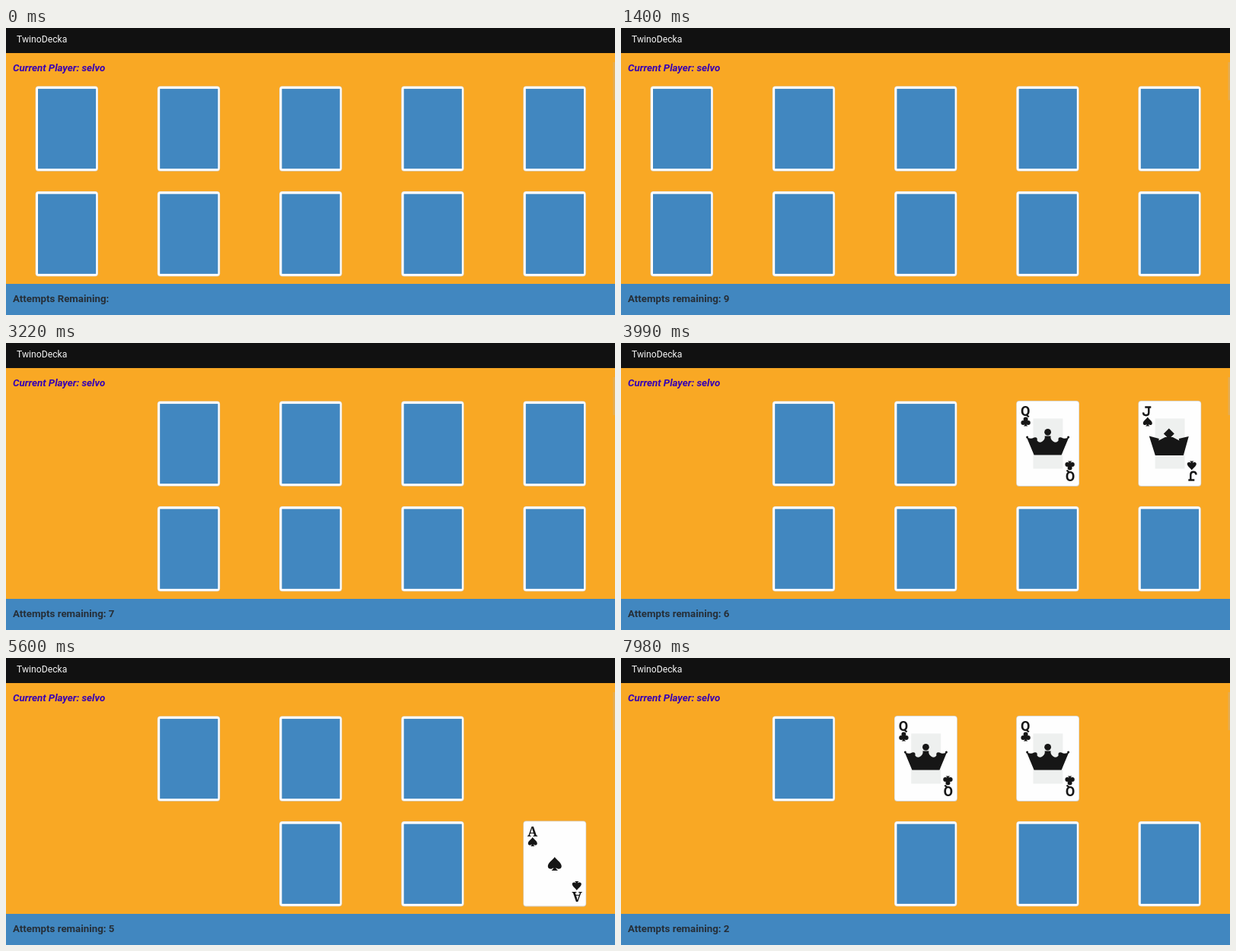
These frames come from a looping animation (800x378 px, 8 s). An HTML page:

```html
<!DOCTYPE html>
<html lang="en">
<head>
<meta charset="utf-8">
<title>Card pairs</title>
<style>
  html, body { margin: 0; width: 100%; height: 100%; overflow: hidden; background: #f9a824; }
  svg { display: block; width: 100%; height: 100%; }
  text { font-family: Roboto, sans-serif; }
  .label { font-size: 13.3px; font-weight: 700; }
  .rank { font: 700 17.5px "Noto Serif", serif; text-anchor: middle; }
  .rank.round { font: 700 18px Roboto, sans-serif; }
</style>
</head>
<body>
<svg viewBox="0 0 800 378">
  <defs>
    <path id="S" d="M0-6C1-4 6-1 6 2.2C6 5 2.5 5.2 1 3.4Q1.3 5.3 2.8 6H-2.8Q-1.3 5.3-1 3.4C-2.5 5.2-6 5-6 2.2C-6-1-1-4 0-6Z"/>
    <g id="C">
      <circle cy="-3" r="3"/><circle cx="-3.2" cy="1.5" r="3"/><circle cx="3.2" cy="1.5" r="3"/>
      <path d="M-1-2H1V3Q1.3 5.3 2.8 6H-2.8Q-1.3 5.3-1 3Z"/>
    </g>
    <g id="back">
      <rect x="-.4" y="-.1" width="82.4" height="112.4" rx="4" fill="#d9d3c8"/>
      <rect x=".2" y=".4" width="81.2" height="111.2" rx="3.5" fill="#fff"/>
      <rect x="3" y="3.6" width="76.2" height="105.2" fill="#4187c0"/>
    </g>
    <g id="blank">
      <rect x="-.4" y="-.4" width="82.8" height="112.8" rx="4" fill="#d3cec4"/>
      <rect x=".2" y=".2" width="81.6" height="111.4" rx="3.5" fill="#fefefe"/>
    </g>
    <g id="artJ">
      <path d="M14 46L27 49.5L26.5 52L35 47.5H45L53.5 52L53 49.5L66 46.5L59 71.5H22Z"/>
      <path d="M40 36L47 43L40 50L33 43Z"/>
    </g>
    <g id="artK">
      <path d="M14 45L26 48Q28 50 27 53Q32 57 36 52L38 48H43L45 52Q49 57 54 53Q53 50 55 48L67.5 44.5L59.5 72H23Z"/>
      <path d="M40.5 35.8L47 43L40.5 50L34 43Z"/>
    </g>
    <g id="artQ">
      <path d="M13 47Q18 51 23 48Q28 47 27 52Q30 56 34 53Q38 50 37 46H45Q44 50 48 53Q52 56 55 52Q54 47 59 48Q64 51 69 47L59 71H23Z"/>
      <circle cx="41" cy="40.8" r="4.4"/><circle cx="14" cy="47.5" r="1.5"/><circle cx="68" cy="47.5" r="1.5"/>
    </g>
  </defs>
  <rect width="800" height="378" fill="#f9a824"/>
  <rect width="800" height="33" fill="#111"/>
  <text x="14" y="18.5" font-size="12.2" fill="#f4f4f4">TwinoDecka</text>
  <text class="label" x="9" y="56.5" font-style="italic" fill="#3700b3">Current Player: selvo</text>
  <rect x="797.5" y="45" width="2.5" height="50" fill="#e5ad53"/>
  <g id="cards"></g>
  <rect y="337" width="800" height="41" fill="#4187c0"/>
  <text class="label" id="status" x="9" y="360.5" fill="#262f38"></text>
</svg>
<script>
const LOOP = 8000;
const deck = ['KS', 'KC', 'QC', 'QC', 'JS', 'KS', 'JS', 'KC', 'AS', 'AS'];

// first card, its flip time, second card, its flip time, end of the turn
const turns = [
  [0, 450, 3, 900, 1330],
  [7, 1600, 2, 1920, 2310],
  [5, 2500, 0, 2800, 3150],
  [4, 3550, 3, 3900, 4300],
  [6, 4520, 4, 4900, 5300],
  [9, 5500, 7, 5900, 6300],
  [8, 6450, 1, 6800, 7250],
  [2, 7480, 3, 7850, LOOP]
];

function corner(rank, suit) {
  const letter = rank === 'J'
    ? '<path d="M8.5 8H16.5M13.5 8V15Q13.5 18.7 10 18.7Q6.3 18.7 6.3 15" fill="none" stroke="#161616" stroke-width="2.4"/>'
    : `<text class="rank${rank === 'Q' ? ' round' : ''}" x="11.7" y="19.5">${rank}</text>`;
  return `${letter}<use href="#${suit}" x="12" y="27"/>`;
}

function face([rank, suit]) {
  const index = corner(rank, suit);
  const art = rank === 'A'
    ? `<use href="#${suit}" transform="translate(41 56) scale(1.5)"/>`
    : `<rect x="21.8" y="23" width="39" height="66" fill="#eef0ef"/><use href="#art${rank}"/>`;
  return `<use href="#blank"/><g fill="#161616">${art}${index}<g transform="rotate(180 41 56)">${index}</g></g>`;
}

const table = document.getElementById('cards');
const status = document.getElementById('status');

table.innerHTML = deck.map((card, i) => {
  const x = 39 + 160.2 * (i % 5), y = i < 5 ? 76.5 : 215;
  return `<g transform="translate(${x} ${y})"><use href="#back"/><g>${face(card)}</g></g>`;
}).join('');

const cards = [...table.children];
const show = (node, on) => node.setAttribute('visibility', on ? 'visible' : 'hidden');

function draw(t) {
  const state = deck.map(() => 'down');
  let used = 0;
  for (const [a, flipA, b, flipB, end] of turns) {
    if (t >= flipB) used++;
    if (t < end) {
      if (t >= flipA) state[a] = 'up';
      if (t >= flipB) state[b] = 'up';
    } else if (deck[a] === deck[b]) {
      state[a] = state[b] = 'gone';
    }
  }
  cards.forEach((card, i) => {
    show(card.firstChild, state[i] === 'down');
    show(card.lastChild, state[i] === 'up');
  });
  status.textContent = used ? `Attempts remaining: ${10 - used}` : 'Attempts Remaining:';
}

const start = performance.now();
function tick() {
  draw((performance.now() - start) % LOOP);
  requestAnimationFrame(tick);
}
tick();
</script>
</body>
</html>
```
